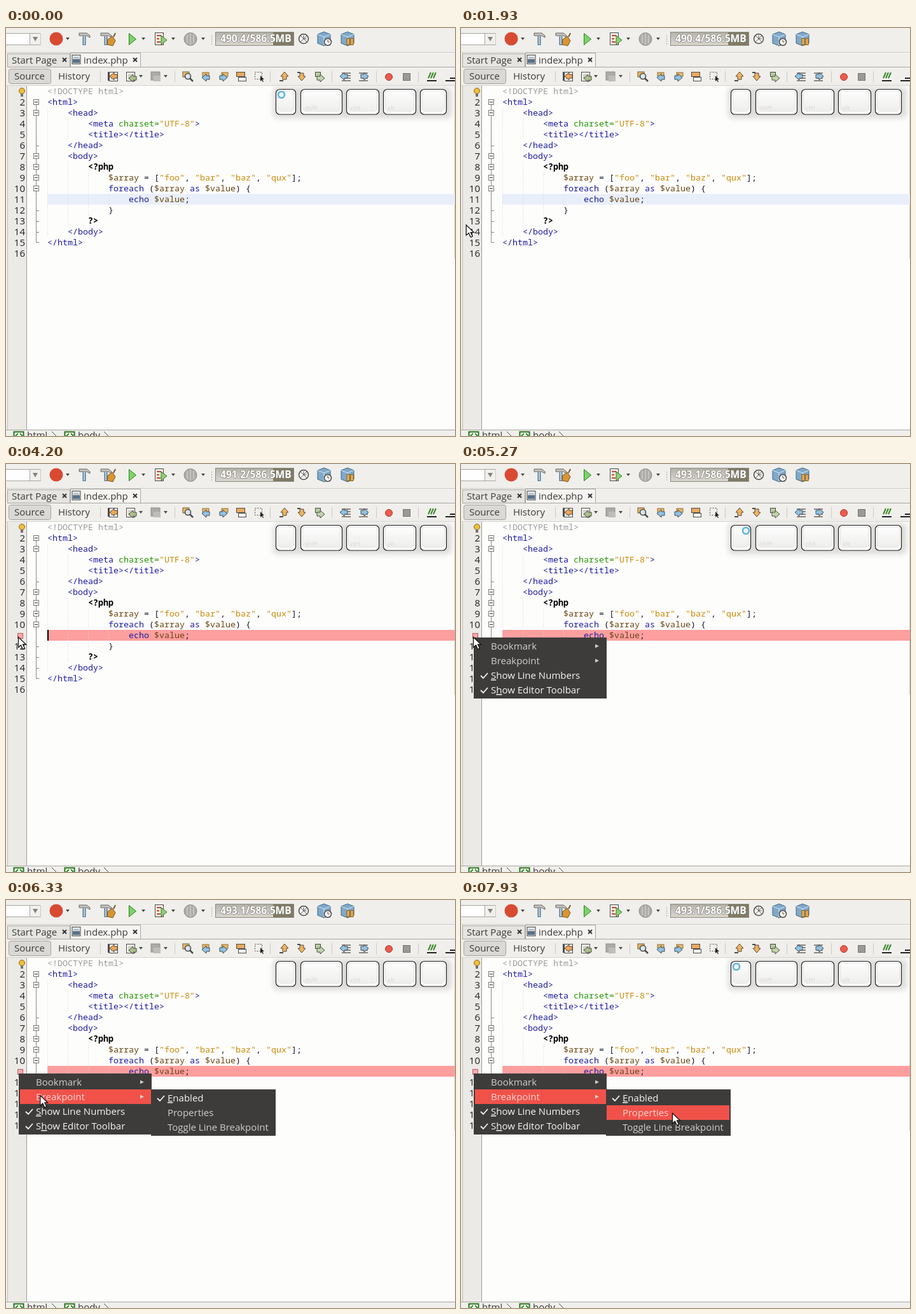
These frames come from a looping animation (706x642 px, 8 s). An HTML page:

```html
<!DOCTYPE html>
<html lang="en">
<meta charset="utf-8">
<title>Editor breakpoint</title>
<style>
  html, body { margin: 0; width: 100%; height: 100%; overflow: hidden; background: #f0efec }
  svg { display: block; width: 706px; height: 642px }
  text { font: 15px "Open Sans", "Noto Sans", sans-serif; fill: #3c3b37; white-space: pre }
  .code text { font: 13.333px "Noto Sans Mono", monospace; fill: #17172e }
  .tag { fill: #1d1ba0 } .doc { fill: #9b9b9b } .att { fill: #259500 }
  .str { fill: #cb8a08 } .var { fill: #6b4410 } .php { fill: #000; font-weight: bold }
  .num { text-anchor: end; fill: #222 }
  .mem { font-size: 15.6px; font-weight: 700; fill: #fff; stroke: #85827a; stroke-width: 1.4px; paint-order: stroke }
  .hint { font-size: 9px; font-weight: 700; fill: #e2e0dd }
  .menu text { fill: #f6f5f2 } .menu .dim { fill: #fff; opacity: .75 }
  .menu tspan { text-decoration: underline }
</style>
<svg id="stage" viewBox="0 0 706 642">
  <defs>
    <linearGradient id="bar" x2="0" y2="1"><stop stop-color="#b5b2aa"/><stop offset="1" stop-color="#dad7d0"/></linearGradient>
    <linearGradient id="cap" x2="0" y2="1"><stop stop-color="#fdfdfd"/><stop offset="1" stop-color="#eeeeec"/></linearGradient>
    <filter id="soft" x="-10%" y="-50%" width="120%" height="200%"><feGaussianBlur stdDeviation="4"/></filter>
  </defs>
</svg>
<script>
const stage = document.getElementById('stage');
const rect = (x, y, w, h, fill, more = '') => `<rect x="${x}" y="${y}" width="${w}" height="${h}" fill="${fill}" ${more}/>`;
const path = (d, fill = 'none', stroke = 'none', more = '') => `<path d="${d}" fill="${fill}" stroke="${stroke}" ${more}/>`;
const circle = (x, y, r, fill, more = '') => `<circle cx="${x}" cy="${y}" r="${r}" fill="${fill}" ${more}/>`;
const text = (x, y, s, cls = '') => `<text x="${x}" y="${y}" class="${cls}">${s}</text>`;
const group = (x, y, body, turn = 0) => `<g transform="translate(${x} ${y}) rotate(${turn})">${body}</g>`;
const layer = (id, body, cls = '') => `<g id="${id}" class="${cls}">${body}</g>`;
const escape = s => s.replace(/&/g, '&amp;').replace(/</g, '&lt;');
const rowY = n => 100 + 17 * (n - 1);
const EDGE = '#a9a69f', INK = '#4d4b46', PAPER = '#fdfdfc', ORANGE = '#f0524a', MENU = '#3d3c3b';

// Window chrome
const drop = (x, y) => path(`M${x - 3} ${y - 2}h6l-3 4z`, INK);
const cross = x => path(`M${x - 3} 47l6 6m0-6l-6 6`, 'none', '#333', 'stroke-width="2"');
const fat = (x, y, turn, fill) => group(x, y, path('M-6-3h5v-3l7 6-7 6v-3h-5z', fill, INK), turn);
const lines = (x, y) => path(`M${x - 7} ${y - 5}h14m-9 4h9m-9 4h9m-14 4h14`, 'none', '#666', 'stroke-width="1.5"');
const page = (x, y, fill = '#f6f5f2') => rect(x - 6.5, y - 7.5, 13, 14, fill, `stroke="${INK}"`) +
  path(`M${x - 4} ${y - 3}h8m-8 3h8m-8 3h5`, 'none', '#8d8a84');
const hammer = x => path(`M${x} 13v14`, 'none', '#527895', 'stroke-width="5"') + path(`M${x} 13v13`, 'none', '#c0d4e2', 'stroke-width="2"') +
  path(`M${x - 8} 8h12l5 4v3l-5-3h-12z`, '#c9c8c5', '#62615c');
const box = x => path(`M${x - 10} 10l10-4 10 4v14l-10 4-10-4z`, '#7fa9cb', '#416780') +
  path(`M${x - 10} 10l10 4 10-4M${x} 14v13`, 'none', '#dbe8f0');
const dial = (x, y, r) => circle(x, y, r, '#f8f7f5', `stroke="${INK}" stroke-width="1.5"`) +
  path(`M${x} ${y - r + 2}v${r - 2}h${r - 3}`, 'none', INK);
const crumb = (x, s) => rect(x + .5, 635.5, 15, 14, '#fff', 'stroke="#27721c" stroke-width="2"') +
  path(`M${x + 7} 638l-4 4 4 4m3-8l4 4`, 'none', '#2b8a20', 'stroke-width="2"') + text(x + 21, 646, s);

const topBar = rect(-1, 8.5, 55, 18, '#fefefe', `stroke="${EDGE}"`) + rect(38, 9, 16, 17, '#f1f0ed') +
  path('M37.5 9v17', 'none', EDGE) + path('M42 14h8l-4 7z', '#84817b') +
  circle(79, 17, 10.5, '#d94a32') + hammer(123) + hammer(157) +
  path('M160 18l7-5 5 7-4 8-9-2z', '#d99532', '#795622') + path('M169 14l3-6', 'none', '#795622', 'stroke-width="2"') +
  path('M193.5 8.5l11 9-11 9z', '#7ed36a', '#278018') +
  rect(234.5, 7.5, 13, 19, '#f0efec', `stroke="${INK}"`) + path('M237 12h7m-7 5h4m-4 5h6', 'none', '#c44a2a', 'stroke-width="2"') +
  path('M244 12l9 7-9 7z', '#8dd079', '#39771e') +
  circle(290, 17.5, 10, '#adaca8', 'stroke="#8d8b86"') + path('M290 8v19m-5-16v13m10-13v13', 'none', '#c6c4c0', 'stroke-width="2"') +
  [97, 216, 263, 310].map(x => drop(x, 17)).join('') +
  path('M323.5 12v14', 'none', EDGE, 'stroke-dasharray="2 2"') +
  rect(329.5, 6.5, 123, 21, 'url(#bar)', 'stroke="#8b8881"') + rect(420, 7, 32, 20, '#807b64') +
  `<text id="memory" class="mem" x="337" y="22"></text>` +
  dial(468, 17, 7.5) + path('M463 12l10 10m0-10l-10 10', 'none', '#62605a') + box(500) + dial(506, 22, 5.5) + box(537) +
  path('M538 16v11m6-11v11', 'none', '#8c570e', 'stroke-width="5"') + path('M538 17v9m6-9v9', 'none', '#f3b352', 'stroke-width="3"');

const tabs = path('M0 38.5h706', 'none', '#c9c7c2') + path('M0 39.5h706', 'none', '#fafaf8') +
  rect(2.5, 40.5, 98, 21, '#e6e4e0', `stroke="${EDGE}"`) + rect(101.5, 39.5, 110, 22, '#f5f4f2', `stroke="${EDGE}"`) +
  path('M211 61.5h495', 'none', EDGE) + text(9, 56, 'Start Page') + cross(92) + text(122, 56, 'index.php') + cross(203) +
  page(110.5, 50, '#dde4ea') + rect(105, 49, 11, 6, '#58748b');

const toolBar = rect(4.5, 64.5, 66, 23, '#dbd9d5', 'rx="3" stroke="#a5a29c"') + text(13, 81, 'Source') + text(82, 81, 'History') +
  [148, 265, 415, 512, 582, 648].map(x => path(`M${x}.5 68v17`, 'none', '#cbc9c4')).join('') +
  page(169, 77) + path('M161 69v14', 'none', INK, 'stroke-width="2"') + fat(169, 76, 180, '#f2a754') +
  page(196, 77) + fat(199, 79, 180, '#a9c38b') + drop(212, 76) +
  rect(228, 69, 14, 13, '#adaba6', 'stroke="#8d8b86"') + rect(232, 75, 11, 9, '#bfbdb9') + drop(251, 76) +
  rect(278, 69, 10, 8, '#e8b96a', 'stroke="#74592c"') + circle(286, 76, 4.5, '#d7e6ee', `stroke="${INK}" stroke-width="1.6"`) +
  path('M289 79l5 5', 'none', INK, 'stroke-width="2.5"') +
  [314, 342].map((x, i) => rect(x - 5 + 2 * i, 70, 10, 6, '#e8b96a', 'stroke="#8c6c35"') + fat(x, 78, i ? 0 : 180, '#8ec3e8')).join('') +
  rect(362.5, 69.5, 13, 7, '#e8a960', `stroke="${INK}"`) + rect(365.5, 77.5, 12, 6, '#f6f5f2', `stroke="${INK}"`) +
  rect(391.5, 69.5, 11, 11, 'none', `stroke="${INK}" stroke-dasharray="2 2"`) + path('M400 75v9l2-2 2 3 1-1-2-3h3z', '#222') +
  fat(438, 75, -90, '#f3b25a') + fat(465, 77, 90, '#f3b25a') + path('M430 83h6m22-13h5', 'none', INK, 'stroke-width="2"') +
  rect(486.5, 69.5, 8, 7, '#b7cba1', `stroke="${INK}"`) + fat(495, 79, 0, '#c4d5aa') +
  lines(535, 76) + fat(531, 76, 180, '#8ec3e8') + lines(562, 76) + fat(564, 76, 0, '#8ec3e8') +
  circle(602, 77, 5.5, '#ec5b4e', 'stroke="#ab3823"') + rect(624.5, 71.5, 11, 11, '#9c9a95', 'stroke="#74726c"') +
  path('M664 79l4-9m0 9l4-9m0 9l4-9', 'none', '#388627', 'stroke-width="2"') + path('M662 83h15M691 83h15M698 79h8', 'none', '#222', 'stroke-width="2"');

// Editor; each token is a class name and its text
const source = [
  [0, 'doc:<!DOCTYPE html>'],
  [0, 'tag:<html>'],
  [4, 'tag:<head>'],
  [8, 'tag:<meta ', 'att:charset=', 'str:"UTF-8"', 'tag:>'],
  [8, 'tag:<title></title>'],
  [4, 'tag:</head>'],
  [4, 'tag:<body>'],
  [8, 'php:<?php'],
  [12, 'var:$array', ': = [', 'str:"foo"', ':, ', 'str:"bar"', ':, ', 'str:"baz"', ':, ', 'str:"qux"', ':];'],
  [12, 'tag:foreach', ': (', 'var:$array', 'tag: as ', 'var:$value', ':) {'],
  [16, 'tag:echo ', 'var:$value', ':;'],
  [12, ':}'],
  [8, 'php:?>'],
  [4, 'tag:</body>'],
  [0, 'tag:</html>']
];
const code = source.map(([indent, ...tokens], i) => text(65 + indent * 8, rowY(i + 1) + 4, tokens.map(token => {
  const cut = token.indexOf(':');
  return `<tspan class="${token.slice(0, cut)}">${escape(token.slice(cut + 1))}</tspan>`;
}).join(''))).join('');

const guides = [[65, 3, 14], [97, 4, 5], [97, 8, 13], [129, 9, 12], [161, 11, 11]].map(([x, a, b]) =>
  path(`M${x}.5 ${rowY(a) - 8}V${rowY(b) + 8}`, 'none', '#d6d5d2', 'stroke-dasharray="1 2"')).join('');
const folds = path('M47.5 121V337.5h5' + [6, 12, 13, 14].map(n => `M47 ${rowY(n) + .5}h5`).join(''), 'none', '#8b8985') +
  [2, 3, 7, 8, 9, 10].map(n => rect(43.5, rowY(n) - 4.5, 8, 8, PAPER, 'stroke="#7b7975"') +
    path(`M45 ${rowY(n) - .5}h5`, 'none', '#333')).join('');
let numbers = '';
for (let n = 2; n <= 16; n++) if (n !== 11) numbers += text(30, rowY(n) + 5, n, 'num');

const editor = rect(33, 91, 673, 541, PAPER) + rect(3, 91, 29, 541, '#ebeae7') + path('M0 90.5h706', 'none', '#d5d3ce') +
  path('M2.5 91V632', 'none', '#bfbdb8') + path('M32.5 91V632', 'none', '#9d9b96') + path('M705.5 91V363', 'none', '#d0cdc6') +
  rect(65, 261, 641, 17, '#e9effa', 'id="activeLine"') + guides + folds + numbers +
  text(30, rowY(11) + 5, 11, 'num" id="eleven') +
  layer('breakpoint', rect(18.5, 266.5, 8, 8, '#fcabaa', 'stroke="#c0575f"')) +
  circle(25, 99, 4.5, '#f2be35', 'stroke="#88661b"') + rect(23, 103, 4, 5, '#77736a') +
  layer('code', code, 'code') + rect(65, 261, 2, 17, '#000', 'id="caret"') +
  path('M0 632.5h706', 'none', EDGE) + crumb(12, 'html') + crumb(92, 'body') +
  path('M72 635l7 7-3 3M154 635l7 7-3 3', 'none', INK);

// Key and mouse indicator
const keycap = ([x, w, label]) => rect(x, 96.5, w, 39.5, '#fefefe', 'rx="6" stroke="#222" stroke-width="1.2"') +
  rect(x + 3, 99, w - 6, 32, 'url(#cap)', 'rx="5" stroke="#e4e3e0"') + text(x + 6, 129, label, 'hint');
const ring = (id, x) => circle(x, 105, 5, '#edf6fb', `id="${id}" stroke="#62b4dc" stroke-width="2.6"`);
const keys = rect(420, 93, 281, 49, '#dddcd9', 'rx="7" filter="url(#soft)"') +
  [[424.5, 31, ''], [463.5, 65, 'shift'], [535.5, 51, 'ctrl'], [593.5, 51, 'alt'], [651.5, 41, '']].map(keycap).join('') +
  ring('leftClick', 433) + ring('rightClick', 448);

// Context menus
const tick = (x, y) => path(`M${x} ${y}l4 4 7-8`, 'none', '#f6f5f2', 'stroke-width="1.8"');
const sub = y => path(`M211 ${y - 3}l6 3-6 3z`, '#cfcdc9');
const key = c => `<tspan>${c}</tspan>`;
const menu = rect(20, 273, 209, 96, MENU) + rect(22, 275, 206, 23, ORANGE, 'id="pick"') +
  text(47, 292, 'Bookmark', 'dim') + sub(286.5) + text(47, 315, 'Breakpoint', 'dim') + sub(309.5) +
  tick(31, 333) + text(47, 338, key('S') + 'how Line Numbers') + tick(31, 356) + text(47, 361, 'S' + key('h') + 'ow Editor Toolbar');
const submenu = rect(228, 298, 196, 73, MENU) + rect(229, 300, 193, 23, ORANGE, 'id="subPick"') +
  tick(238, 312) + text(254, 317, key('E') + 'nabled') + text(254, 340, 'Properties', 'dim') + text(254, 363, 'Toggle Line Breakpoint', 'dim');
const pointer = path('M.5.5v16l4-3.5 3 6.5 3-1.4-3-6.1h5z', '#fff', '#111', 'stroke-width="1.3"');

stage.innerHTML += topBar + tabs + toolBar + editor + keys +
  layer('menu', menu, 'menu') + layer('submenu', submenu, 'menu') + layer('pointer', pointer);

const $ = id => document.getElementById(id);
const show = (id, on) => $(id).setAttribute('visibility', on ? 'inherit' : 'hidden');
const between = (t, a, b) => t >= a && t < b;

// Pointer stops: time, x, y
const stops = [[1330, -14, 345], [1800, 4, 322], [2330, 19, 272], [5600, 19, 272], [6000, 45, 296],
  [6330, 53, 307], [6930, 236, 313], [7500, 332, 335]];
function pointerAt(t) {
  const i = stops.findIndex(s => s[0] > t);
  if (i < 1) return (i ? stops[stops.length - 1] : stops[0]).slice(1);
  const [a, x, y] = stops[i - 1], [b, u, v] = stops[i];
  const k = (t - a) / (b - a);
  return [x + (u - x) * k, y + (v - y) * k];
}

function draw(now) {
  const t = now % 8000, [x, y] = pointerAt(t);
  const broken = t >= 3470, opened = t >= 5130, nested = t >= 6200;
  $('memory').textContent = (t < 2470 ? '490.4' : t < 3470 ? '491.1' : t < 5130 ? '491.2' : '493.1') + '/586.5MB';
  $('activeLine').setAttribute('fill', broken ? '#fd9f9f' : '#e9effa');
  show('eleven', !broken);
  show('breakpoint', broken);
  show('caret', between(t, 3470, 4470));
  show('leftClick', t < 400 || between(t, 3400, 3950) || t >= 7600);
  show('rightClick', between(t, 5000, 5550));
  show('menu', opened);
  show('pick', opened && x > 20);
  $('pick').setAttribute('y', y < 298 ? 275 : 298);
  show('submenu', nested);
  show('subPick', nested && x > 229);
  $('subPick').setAttribute('y', y < 323 ? 300 : 323);
  show('pointer', t >= 1330);
  $('pointer').setAttribute('transform', `translate(${x} ${y})`);
  requestAnimationFrame(draw);
}
requestAnimationFrame(draw);
</script>
</html>
```
